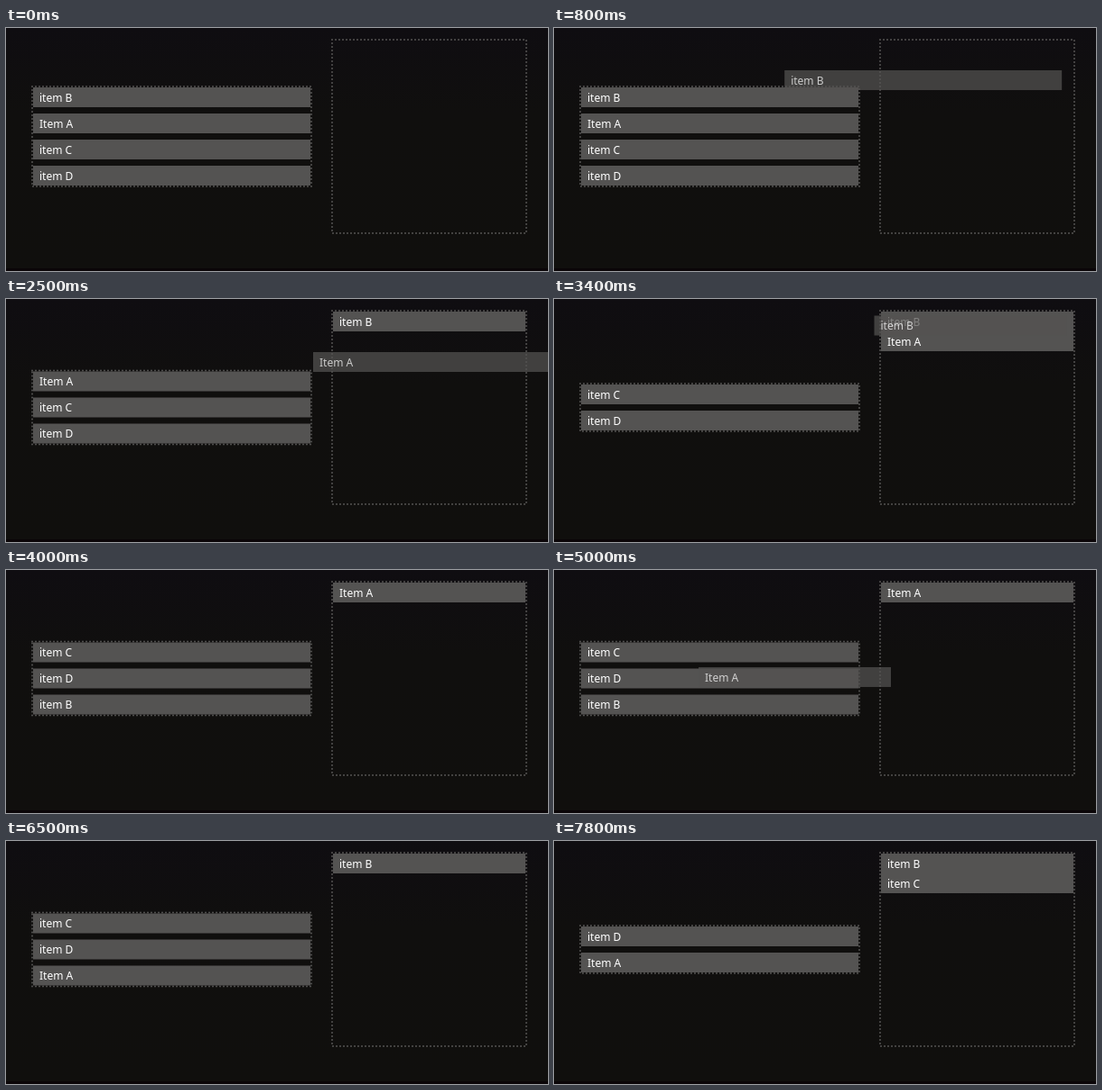
Write an HTML page with a canvas that moves like this. It is 600 by 270 pixels and loops after 8000 ms.

```html
<!DOCTYPE html>
<html lang="en">
<head>
<meta charset="utf-8">
<title>Drag and drop lists</title>
<style>
  html, body { margin: 0; width: 100%; height: 100%; overflow: hidden; background: #100f0e; }
  canvas { display: block; width: 600px; height: 270px; }
</style>
</head>
<body>
<canvas id="stage" width="600" height="270"></canvas>
<script>
const ctx = document.getElementById('stage').getContext('2d');
const LOOP = 8000, STEP = 100;
const ROW = 22, GAP = 7, MID = 120.5;
const LEFT = { x: 30, w: 307 }, RIGHT = { x: 362, y: 14, w: 213, h: 213 };

// Each drag: item, target list, start and drop time, first and last ghost position.
const drags = [
  { id: 'B', toRight: true,  start: 500,  drop: 1200, a: [35, 66],    b: [336, 40] },
  { id: 'A', toRight: true,  start: 2100, drop: 2600, a: [36, 79],    b: [340, 59] },
  { id: 'B', toRight: false, start: 3400, drop: 4000, a: [354.5, 18.5], b: [75, 122] },
  { id: 'A', toRight: false, start: 4800, drop: 5300, a: [357, 18],   b: [87.7, 141] },
  { id: 'B', toRight: true,  start: 6200, drop: 6500, a: [42, 121],   b: [338, 50] },
  { id: 'C', toRight: true,  start: 7000, drop: 7500, a: [36, 79],    b: [338, 58] }
];

const label = id => (id === 'A' ? 'Item ' : 'item ') + id;

// Quick start, soft landing.
function ease(p) {
  const q = Math.pow(p, 0.6);
  return q * q * (3 - 2 * q);
}

function listsAt(t) {
  let left = ['B', 'A', 'C', 'D'], right = [];
  for (const d of drags) {
    if (t < d.drop) break;
    left = left.filter(id => id !== d.id);
    right = right.filter(id => id !== d.id);
    (d.toRight ? right : left).push(d.id);
  }
  return { left, right };
}

function drawItem(id, x, y, w) {
  ctx.fillStyle = '#545352';
  ctx.fillRect(x, y, w, ROW);
  ctx.fillStyle = '#fff';
  ctx.fillText(label(id), x + 7, y + 15.7);
}

function drawZone(x, y, w, h) {
  ctx.strokeStyle = '#545352';
  ctx.lineWidth = 2;
  ctx.lineCap = 'round';
  ctx.setLineDash([0, 4]);
  ctx.strokeRect(x - 1, y - 1, w + 2, h + 2);
}

function drawBackground() {
  const g = ctx.createLinearGradient(0, 0, 0, 270);
  g.addColorStop(0, '#0f0d11');
  g.addColorStop(0.35, '#100f0e');
  g.addColorStop(1, '#100f0d');
  ctx.fillStyle = g;
  ctx.fillRect(0, 0, 600, 270);
  ctx.fillStyle = '#0a0507';
  ctx.fillRect(0, 267, 600, 3);
}

function drawGhost(d, t) {
  const p = (t - d.start) / (d.drop - STEP - d.start);
  const [x, y] = d.a.map((v, i) => v + (d.b[i] - v) * ease(p));
  ctx.globalAlpha = 0.73;
  drawItem(d.id, x, y, d.toRight ? LEFT.w : RIGHT.w);
  ctx.globalAlpha = 1;
}

function draw(t) {
  const { left, right } = listsAt(t);
  const height = left.length * (ROW + GAP) - GAP;
  const top = MID - height / 2;

  ctx.font = '500 12px "Noto Sans", "Open Sans", sans-serif';
  drawBackground();
  drawZone(LEFT.x, top, LEFT.w, height);
  drawZone(RIGHT.x, RIGHT.y, RIGHT.w, RIGHT.h);
  left.forEach((id, i) => drawItem(id, LEFT.x, top + i * (ROW + GAP), LEFT.w));
  right.forEach((id, i) => drawItem(id, RIGHT.x, RIGHT.y + i * ROW, RIGHT.w));

  const active = drags.find(d => t >= d.start && t < d.drop);
  if (active) drawGhost(active, t);
}

const begin = performance.now();
function tick() {
  const t = (performance.now() - begin) % LOOP;
  draw(Math.floor(t / STEP) * STEP);
  requestAnimationFrame(tick);
}
tick();
</script>
</body>
</html>
```
